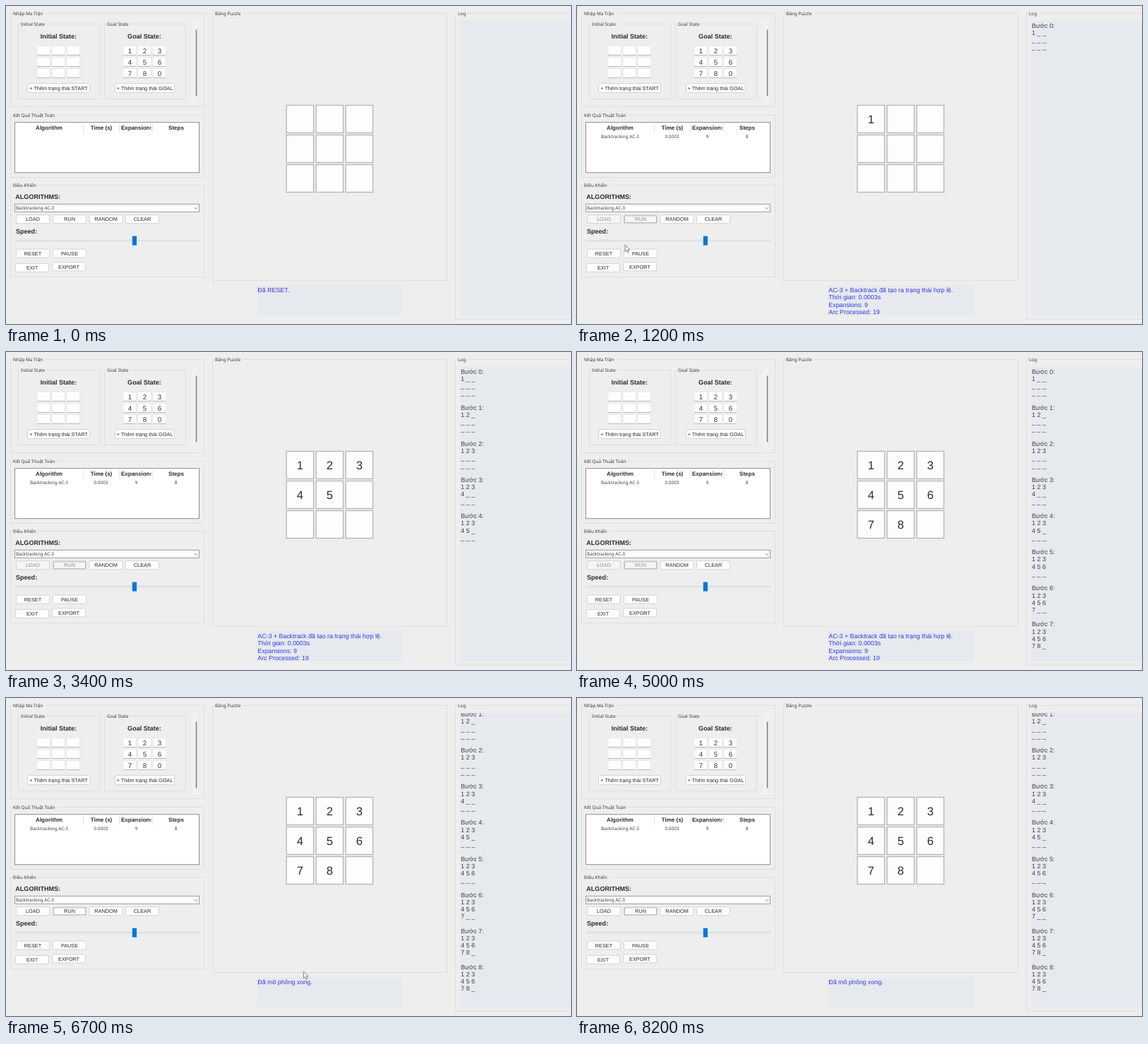
Animation of 800x450 px, one loop 8.3 s. Source, as an HTML page:

```html
<!DOCTYPE html>
<html lang="vi">
<head>
<meta charset="utf-8">
<style>
html, body { margin: 0; width: 100%; height: 100%; overflow: hidden; background: #eee; }
svg { display: block; width: 800px; height: 450px; }
text { font-family: "Liberation Sans", Arial, sans-serif; fill: #2c2c2c; white-space: pre; text-rendering: geometricPrecision; }
.ui { font-family: "Noto Sans", "Open Sans", sans-serif; font-size: 6.4px; fill: #3a3a3a; }
.btn { font-size: 7.3px; }
.bold { font-size: 9.05px; font-weight: bold; }
.head { font-size: 8px; font-weight: bold; }
.log { font-size: 9px; fill: #404040; }
.msg { font-size: 8.87px; fill: #3636e4; }
.num { font-size: 9.7px; fill: #383838; }
.tile { font-size: 16.5px; }
.mid { text-anchor: middle; }
</style>
</head>
<body>
<svg id="stage" viewBox="0 0 800 450">
  <clipPath id="logClip"><rect x="642" y="21.5" width="158" height="415"/></clipPath>
  <clipPath id="colClip"><rect x="161" y="166" width="44.5" height="14"/></clipPath>
</svg>
<script>
const LOOP = 8300, START = 1040, STEP = 508, DONE = 5590, SCROLL = 6150;
const stage = document.getElementById("stage");

function add(tag, attrs, parent = stage) {
  const el = document.createElementNS("http://www.w3.org/2000/svg", tag);
  for (const k in attrs) el.setAttribute(k, attrs[k]);
  return parent.appendChild(el);
}
const group = (parent, attrs = {}) => add("g", attrs, parent);
const rect = (x, y, width, height, fill, stroke = "none", extra = {}, parent) =>
  add("rect", { x, y, width, height, fill, stroke, ...extra }, parent);
const line = (x1, y1, x2, y2, stroke, width = 1) =>
  add("line", { x1, y1, x2, y2, stroke, "stroke-width": width });
function text(str, x, y, cls, parent) {
  const el = add("text", { x, y, class: cls }, parent);
  el.textContent = str;
  return el;
}
const show = (el, on) => el.setAttribute("visibility", on ? "visible" : "hidden");

function frame(label, x, y, w, h, labelWidth) {
  rect(x + .5, y + .5, w, h, "none", "#dedede");
  rect(x + 3, y - 3, labelWidth + 3, 7, "#eee");
  text(label, x + 4, y + 2.6, "ui");
}
function button(label, x, y, w = 48, h = 13) {
  const box = rect(x + .5, y + .5, w - 1, h - 1, "#fdfdfd", "#d4d4d4", { rx: 1.5 });
  const caption = text(label, x + w / 2, y + h / 2 + 2.7, "btn mid");
  return { box, caption };
}

// Input panel
frame("Nhập Ma Trận", 6, 10, 274, 132, 44);
frame("Initial State", 17, 25, 115, 106, 34);
frame("Goal State", 139, 25, 115, 106, 31);
text("Initial State:", 74.5, 45.8, "bold mid");
text("Goal State:", 196, 45.8, "bold mid");
for (let i = 0; i < 9; i++) {
  const col = i % 3, row = Math.floor(i / 3), y = 56.5 + row * 16;
  for (const left of [44, 166]) {
    const x = left + col * 21;
    rect(x, y, 18.5, 13, "#fefefe", "#e4e4e4", { "stroke-width": .7 });
    line(x, y + 13, x + 18.5, y + 13, "#b0b0b0", .8);
  }
  text((i + 1) % 9, 175.5 + col * 21, y + 10, "num mid");
}
button("+ Thêm trạng thái START", 30, 109, 89, 14);
button("+ Thêm trạng thái GOAL", 154, 109, 85, 14);
rect(264, 20, 7, 117, "#f2f2f2");
line(269.5, 33.5, 269.5, 127.5, "#808080", 1.6);

// Results table
frame("Kết Quả Thuật Toán", 6, 154, 274, 88, 61);
rect(12.5, 164.7, 261, 71, "#fff", "#8e8e8e");
for (const x of [109.5, 160.5, 207.5]) line(x, 167, x, 179, "#e2e2e2");
text("Algorithm", 61, 174.6, "head mid");
text("Time (s)", 135, 174.6, "head mid");
text("Expansions", 163, 174.6, "head", group(stage, { "clip-path": "url(#colClip)" }));
text("Steps", 241, 174.6, "head mid");
const result = group(stage);
[["Backtracking AC-3", 61], ["0.0003", 134.5], ["9", 184.5], ["8", 240.5]]
  .forEach(([s, x]) => text(s, x, 186.5, "ui mid", result));

// Controls
frame("Điều Khiển", 6, 253, 274, 130, 34);
text("ALGORITHMS:", 13.3, 273.3, "bold");
rect(12.5, 280.3, 261, 11, "#fdfdfd", "#9c9c9c");
text("Backtracking AC-3", 14, 288.2, "ui");
add("path", { d: "M266.5 285l2.3 2.3 2.3-2.3", fill: "none", stroke: "#777", "stroke-width": .8 });
const load = button("LOAD", 14, 295.2);
const run = button("RUN", 66, 295.2);
const focus = rect(67.5, 296.9, 45, 9.8, "none", "#b4b4b4", { "stroke-width": .9 });
button("RANDOM", 117.5, 295.2);
button("CLEAR", 169, 295.2);
text("Speed:", 14, 321.5, "bold");
rect(13, 331, 261, 2, "#e5e5e5", "#d9d9d9", { "stroke-width": .6 });
rect(178.8, 325.6, 6.2, 13, "#0078d7");
button("RESET", 14, 343.5);
button("PAUSE", 66, 343.5);
button("EXIT", 13, 363.8);
button("EXPORT", 65, 362.3);

// Board
frame("Bảng Puzzle", 292, 10, 332, 378, 38);
const tiles = [];
for (let i = 0; i < 9; i++) {
  const x = 397 + (i % 3) * 42, y = 140.5 + Math.floor(i / 3) * 42;
  rect(x, y, 38.5, 39, "#fdfdfd", "#b4b4b4", { "stroke-width": 1.3 });
  if (i < 8) tiles.push(text(i + 1, x + 19.3, y + 25.5, "tile mid"));
}

// Status messages
rect(355, 395.5, 206.5, 42.5, "#e6eaef");
function message(...lines) {
  const g = group(stage);
  lines.forEach((s, i) => text(s, 356.3, 405.1 + i * 10.25, "msg", g));
  return g;
}
const resetMsg = message("Đã RESET.");
const solvedMsg = message("AC-3 + Backtrack đã tạo ra trạng thái hợp lệ.",
  "Thời gian: 0.0003s", "Expansions: 9", "Arc Processed: 19");
const doneMsg = message("Đã mô phỏng xong.");

// Log
frame("Log", 636, 10, 180, 433, 12);
rect(643, 21, 157, 416.5, "#e6eaef");
const log = group(group(stage, { "clip-path": "url(#logClip)" }));
const steps = Array.from({ length: 9 }, (_, k) => {
  const g = group(log), y = 30.7 + k * 51.1;
  text(`Bước ${k}:`, 644, y, "log", g);
  for (let row = 0; row < 3; row++) {
    const cells = [1, 2, 3].map(c => row * 3 + c).map(n => n <= Math.min(k + 1, 8) ? n : "_");
    text(cells.join(" "), 644, y + 10.2 * (row + 1), "log", g);
  }
  return g;
});

// Pointer
const pointer = add("path", { d: "M0 0V9.6L2.2 7.6 3.8 11 5.2 10.3 3.7 7.1H6.7Z",
  fill: "#fff", stroke: "#666", "stroke-width": .8 });
const trips = [
  [[100, 490, 394], [350, 300, 350], [650, 92, 301], [950, 90, 303], [1200, 68, 338], [1500, 68, 338]],
  [[5500, 100, 345], [5800, 355.5, 374], [6100, 764, 240], [6350, 764, 240],
   [6700, 422, 387], [7000, 220, 400], [7200, 118, 405]]
];
function pointerAt(t) {
  const trip = trips.find(p => t >= p[0][0] && t < p[p.length - 1][0]);
  if (!trip) return null;
  const i = trip.findIndex(p => p[0] > t);
  const [t0, x0, y0] = trip[i - 1], [t1, x1, y1] = trip[i];
  const u = (t - t0) / (t1 - t0);
  return [x0 + (x1 - x0) * u, y0 + (y1 - y0) * u];
}

function render(t) {
  const step = Math.floor((t - START) / STEP);
  const started = t >= START, done = t >= DONE, busy = started && !done;
  tiles.forEach((el, i) => show(el, i <= step));
  steps.forEach((el, i) => show(el, i <= step));
  log.setAttribute("transform", `translate(0 ${t >= SCROLL ? -55.6 : 0})`);
  show(result, started);
  show(resetMsg, !started);
  show(solvedMsg, busy);
  show(doneMsg, done);
  show(focus, started);
  for (const b of [load, run]) {
    b.caption.style.fill = busy ? "#929292" : "";
    b.box.setAttribute("fill", busy ? "#f5f5f5" : "#fdfdfd");
  }
  const pos = pointerAt(t);
  show(pointer, pos);
  if (pos) pointer.setAttribute("transform", `translate(${pos})`);
}

const origin = performance.now();
function tick() {
  render((performance.now() - origin) % LOOP);
  requestAnimationFrame(tick);
}
tick();
</script>
</body>
</html>
```
